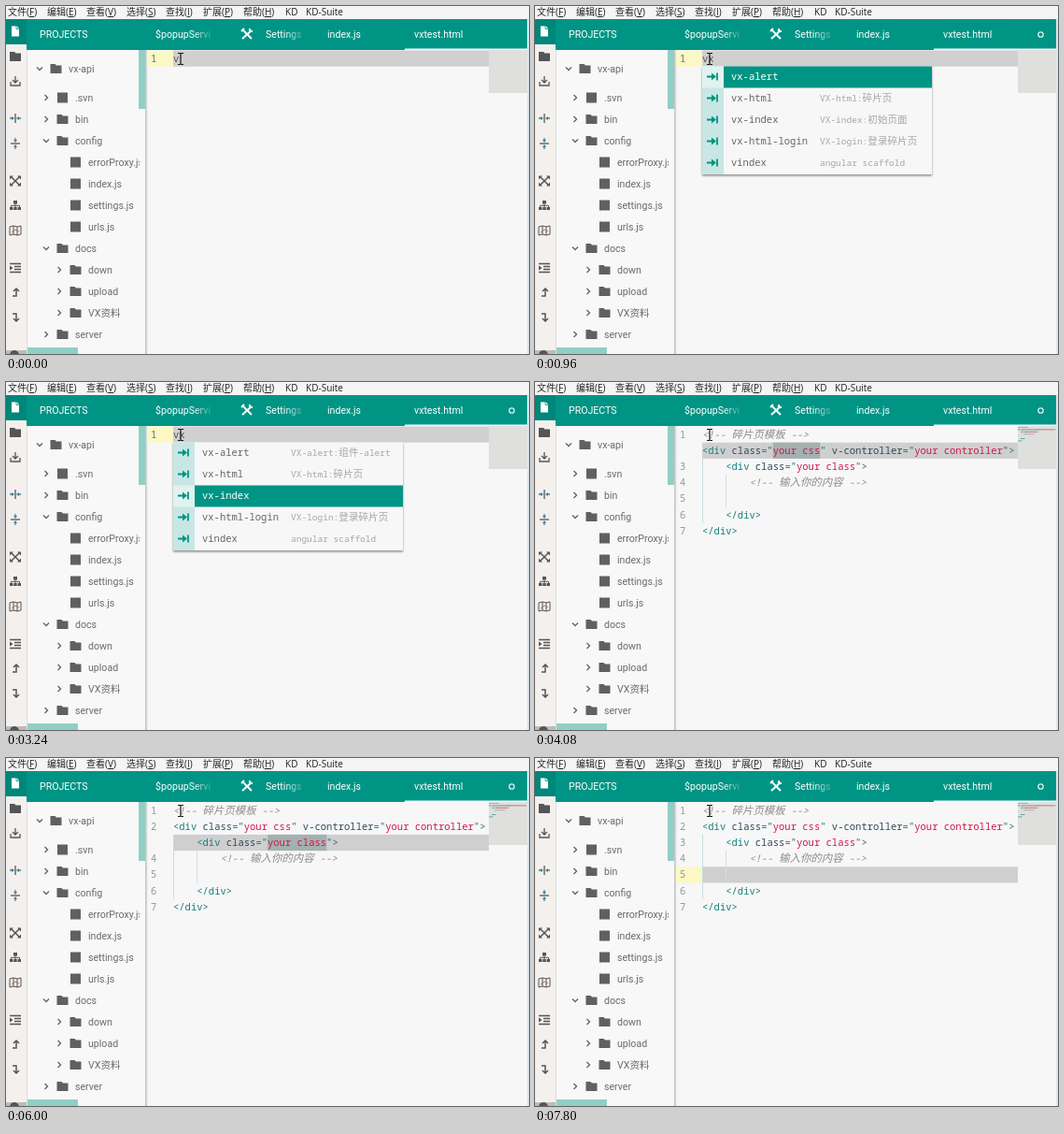
Recreate the animation shown at these times as an HTML page. Size 560 px wide and 372 px high, loop 8000 ms.

```html
<!DOCTYPE html>
<html lang="zh">
<head>
<meta charset="utf-8">
<style>
  html, body { margin: 0; width: 100%; height: 100%; overflow: hidden; background: #f7f7f7; }
  svg { display: block; width: 560px; height: 372px; }
  text { white-space: pre; }
  .ui { font: 10.6px Roboto, "Noto Sans CJK SC", sans-serif; }
  .menu { font: 10px "Open Sans", "Noto Sans CJK SC", sans-serif; }
  .code { font: 10.53px "Noto Sans Mono", "Noto Sans CJK SC", monospace; }
  .note { font: 9.5px "Noto Sans Mono", "Noto Sans CJK SC", monospace; }
</style>
</head>
<body>
<svg viewBox="0 0 560 372">
  <defs>
    <linearGradient id="fade">
      <stop stop-color="#009485" stop-opacity="0"/>
      <stop offset="1" stop-color="#009485"/>
    </linearGradient>
    <linearGradient id="edge">
      <stop stop-color="#bbb"/>
      <stop offset="1" stop-color="#f7f7f7"/>
    </linearGradient>
    <clipPath id="tree"><path d="M23 47H143V365H23z"/></clipPath>
    <filter id="shadow" x="-5%" y="-5%" width="110%" height="115%">
      <feDropShadow dx="0" dy="1.5" stdDeviation="1.2" flood-opacity=".45"/>
    </filter>
  </defs>
  <g id="frame"></g>
  <g id="editor"></g>
</svg>
<script>
const TEAL = '#009485', CHAR = 6.32, LINE = 17.2, LEFT = 179;
const $ = id => document.getElementById(id);
const esc = s => s.replace(/&/g, '&amp;').replace(/</g, '&lt;');
const rect = (x, y, w, h, fill, more = '') =>
  `<rect x="${x}" y="${y}" width="${w}" height="${h}" fill="${fill}" ${more}/>`;
const text = (x, y, s, cls, fill, more = '') =>
  `<text x="${x}" y="${y}" class="${cls}" fill="${fill}" ${more}>${s}</text>`;
const line = (d, color, w = 1.3, more = '') =>
  `<path d="${d}" fill="none" stroke="${color}" stroke-width="${w}" ${more}/>`;
const shape = (d, fill) => `<path d="${d}" fill="${fill}"/>`;
const at = (x, y, s) => `<g transform="translate(${x} ${y})">${s}</g>`;
// Chinese glyphs are set a little larger than the monospaced Latin
const wide = (s, size) =>
  esc(s).replace(/[\u4e00-\u9fff]+/g, m => `<tspan font-size="${size}">${m}</tspan>`);

const folder = fill => shape('M-6 -5H-1L.5 -3.5H6V5H-6z', fill);

function menuBar() {
  const items = [[2, '文件', 'F'], [44, '编辑', 'E'], [86, '查看', 'V'], [129, '选择', 'S'],
    [171, '查找', 'I'], [211, '扩展', 'P'], [254, '帮助', 'H'], [299, 'KD'], [321, 'KD-Suite']];
  return rect(0, 0, 560, 14, '#f4f5f5') + items.map(([x, s, key]) => text(x, 10,
    s + (key ? `(<tspan text-decoration="underline">${key}</tspan>)` : ''), 'menu', '#222')).join('');
}

function toolBar() {
  const c = '#555', b = '#4c7f9c';
  const icons = [
    [54, folder(c)],
    [80, line('M0 -5V2M-3 -1L0 2L3 -1M-5 1V5H5V1', c)],
    [120, line('M0 -5V5', c) + line('M-6 0H-2M2 0H6', b) + shape('M-4 -2L-1 0L-4 2zM4 -2L1 0L4 2z', b)],
    [147, line('M-5 0H5', c) + line('M0 -6V-2M0 2V6', b) + shape('M-2 -4L0 -1L2 -4zM-2 4L0 1L2 4z', b)],
    [187, line('M-4 -4L4 4M4 -4L-4 4', c, 1.5) +
      shape('M-6 -5.5H-2L-6 -1.5zM6 -5.5H2L6 -1.5zM-6 5.5H-2L-6 1.5zM6 5.5H2L6 1.5z', c)],
    [213, shape('M-2 -5H2V-1.5H-2zM-6 2H-2.5V5H-6zM-1.7 2H1.7V5H-1.7zM2.5 2H6V5H2.5z', c) +
      line('M0 -2V2M-4.5 2V.3H4.5V2', c, 1)],
    [240, line('M-6 -4L-2 -5L2 -4L6 -5V4L2 5L-2 4L-6 5zM-2 -5V4M2 -4V5', c, 1) +
      line('M-4 2L0 -1L4 1', '#b06a5a', 1)],
    [280, line('M-6 -4.5H6M-1 -1.5H6M-1 1.5H6M-6 4.5H6', c, 1.6) + shape('M-6 -2.5L-2.5 0L-6 2.5z', c)],
    [306, line('M-3 4H1V-3M-2 -1L1 -4L4 -1', c, 1.5)],
    [333, line('M-3 -4H1V3M-2 1L1 4L4 1', c, 1.5)]
  ];
  return rect(0, 14, 22, 358, '#f4f0ed') + rect(0, 14, 23, 27, '#00877a') +
    at(10, 27, shape('M-4 -5.5H1.5L4 -3V5.5H-4z', '#fff') + line('M1 -5.5V-2.5H4', TEAL, .8)) +
    icons.map(([y, s]) => at(10, y, s)).join('') +
    rect(0, 368, 22, 4, '#bbb') + `<circle cx="9" cy="373" r="5" fill="#555"/>` +
    rect(22, 41, 1, 331, '#ddd');
}

function header() {
  const tab = (x, s) => text(x, 34, s, 'ui', '#fff', 'font-weight="500"');
  return rect(22, 14, 536, 33, TEAL) + tab(36, 'PROJECTS') + tab(160, '$popupServi') +
    tab(278, 'Settings') + tab(344, 'index.js') + tab(437, 'vxtest.html') +
    rect(200, 20, 24, 20, 'url(#fade)') + rect(298, 20, 24, 20, 'url(#fade)') +
    at(258, 30, line('M-5 -5L5 5M5 -4L-5 5', '#fff', 2) +
      line('M-6 -3L-3 -6M3 -6V-3H6', '#fff', 1.8)) +
    rect(427, 45.5, 131, 1.5, '#f4fbfa');
}

function sideBar() {
  // name, level, kind: o = open folder, c = closed folder, s and x = plain square
  const rows = [['.svn', 1, 'x'], ['bin', 1, 'c'], ['config', 1, 'o'], ['errorProxy.js', 2, 's'],
    ['index.js', 2, 's'], ['settings.js', 2, 's'], ['urls.js', 2, 's'], ['docs', 1, 'o'],
    ['down', 2, 'c'], ['upload', 2, 'c'], ['VX资料', 2, 'c'], ['server', 1, 'c']];
  const row = (name, x, y, kind) =>
    (kind === 's' ? '' : at(x - 31, y, line(kind === 'o' ? 'M-3 -1.5L0 1.5L3 -1.5' : 'M-1.5 -3L1.5 0L-1.5 3', '#666', 1.4))) +
    at(x - 13.5, y, 'sx'.includes(kind) ? rect(-5.5, -5.5, 11, 11, '#606060') : folder('#606060')) +
    text(x, y + 4, name, 'ui', '#6a6a6a');
  return rect(23, 47, 126, 325, '#f8f8f8') + `<g clip-path="url(#tree)">` + row('vx-api', 67, 67, 'o') +
    rows.map(([s, level, kind], i) => row(s, 60 + 14 * level, 98 + 23 * i, kind)).join('') + '</g>' +
    rect(142, 47, 7, 63, '#90cfc6') + rect(23, 365, 54, 7, '#90cfc6') +
    rect(149, 47, 3, 325, 'url(#edge)');
}

const CODE = [
  '<!-- 碎片页模板 -->',
  '<div class="your css" v-controller="your controller">',
  '    <div class="your class">',
  '        <!-- 输入你的内容 -->',
  '',
  '    </div>',
  '</div>'
];
const tokens = s => s.split(/(<!--.*-->|<\/?div|your \w+|[\w-]+(?==))/).filter(Boolean);
const tint = s => s.startsWith('<!') ? '#8c8c8c' : s.startsWith('your') ? '#d01848' :
  s[0] === '<' ? '#13807f' : /^\w/.test(s) ? '#2f4858' : '#2a6f78';
const rowY = row => 47.5 + LINE * (row - 1);

function codeLine(s, i) {
  const spans = tokens(s).map(t =>
    `<tspan fill="${tint(t)}"${t.startsWith('<!') ? ' font-style="italic"' : ''}>${wide(t, 11.45)}</tspan>`);
  return text(LEFT, rowY(i + 1) + 12, spans.join(''), 'code', '#333');
}

function miniMap() {
  return CODE.map((s, i) => {
    let n = 0;
    return tokens(s).map(t => {
      const x = 517 + n * .76;
      n += t.length;
      return t.trim() ? rect(x, 48 + i * 2.4, t.length * .76, 1, tint(t), 'opacity=".6"') : '';
    }).join('');
  }).join('');
}

function template({ row, from, pick, gutter }) {
  let s = rect(LEFT, rowY(row), 338, LINE, '#cfcfcf');
  if (gutter) s += rect(151, rowY(row), 28, LINE, '#fbf8c6');
  if (pick) s += rect(LEFT + from * CHAR, rowY(row), pick * CHAR, LINE, '#a3b1b0');
  s += line(`M179.5 ${rowY(3)}V${rowY(7)}`, '#c4dde0', 1) +
    line(`M204.5 ${rowY(4)}V${rowY(6)}`, '#d5dcdc', 1);
  CODE.forEach((c, i) => {
    if (gutter || i + 1 !== row) s += text(155, rowY(i + 1) + 12, i + 1, 'code', '#8a9a98');
    s += codeLine(c, i);
  });
  return s + miniMap();
}

const SNIPPETS = [['vx-alert', 'VX-alert:组件-alert'], ['vx-html', 'VX-html:碎片页'],
  ['vx-index', 'VX-index:初始页面'], ['vx-html-login', 'VX-login:登录碎片页'], ['vindex', 'angular scaffold']];

function popup(sel) {
  return rect(179, 64.5, 246, 115.5, '#f7f7f7', 'filter="url(#shadow)"') +
    rect(179, 64.5, 23, 115.5, '#c8e7e4') +
    SNIPPETS.map(([name, note], i) => {
      const y = 64.5 + 23 * i, on = i === sel;
      return (on ? rect(179, y, 23, 23, '#e2f2f0') + rect(202, y, 223, 23, TEAL) : '') +
        at(190, y + 11, line('M-6 0H1M5 -4V4', TEAL, 1.8) + shape('M-1 -4L4 0L-1 4z', TEAL)) +
        text(210, y + 14.5, name, 'code', on ? '#fff' : '#666', on ? 'font-weight="700"' : '') +
        (on ? '' : text(305, y + 14.5, wide(note, 10.6), 'note', '#a6a6a6'));
    }).join('');
}

const typed = ({ word, sel, caret }) =>
  rect(151, 47.5, 28, LINE, '#fbf8c6') + rect(LEFT, 47.5, 338, LINE, '#d0d0d0') +
  text(155, 59.5, 1, 'code', '#5f7472') + text(LEFT, 59.5, word, 'code', '#555') +
  (caret ? rect(LEFT + word.length * CHAR - .5, 47.5, 1.3, LINE, TEAL) : '') +
  (sel === undefined ? '' : popup(sel));

const iBeam = line('M184 50.5H186L187 51L188 50.5H190M187 51V62M184 62.5H186L187 62L188 62.5H190', '#111', 1.2);

const STEPS = [
  [0, { word: 'v', saved: true }],
  [240, { word: 'v' }],
  [360, { word: 'v', sel: 0 }],
  [720, { word: 'vx', sel: 0 }],
  [1320, { word: 'vx', sel: 1, caret: true }],
  [1800, { word: 'vx', sel: 2 }],
  [2280, { word: 'vx', sel: 1, caret: true }],
  [2760, { word: 'vx', sel: 1 }],
  [3240, { word: 'vx', sel: 2 }],
  [3720, { word: 'vx', sel: 1, caret: true }],
  [4080, { row: 2, from: 12, pick: 8 }],
  [4920, { row: 2, from: 36, pick: 15 }],
  [5520, { row: 3, from: 16, pick: 10 }],
  [7200, { row: 5, gutter: true }]
];

$('frame').innerHTML = rect(0, 0, 560, 372, '#f7f7f7') + menuBar() + toolBar() + header() + sideBar() +
  rect(517, 47, 41, 46, '#dfe0dd') + rect(558, 14, 2, 358, '#dbe7ef');

let shown;
function tick() {
  const t = performance.now() % 8000;
  const state = STEPS.findLast(s => s[0] <= t)[1];
  if (state !== shown) {
    shown = state;
    $('editor').innerHTML = (state.row ? template(state) : typed(state)) + iBeam +
      (state.saved ? '' : '<circle cx="541.5" cy="30.5" r="2.7" fill="none" stroke="#d8f0ec" stroke-width="1.3"/>');
  }
  requestAnimationFrame(tick);
}
tick();
</script>
</body>
</html>
```
